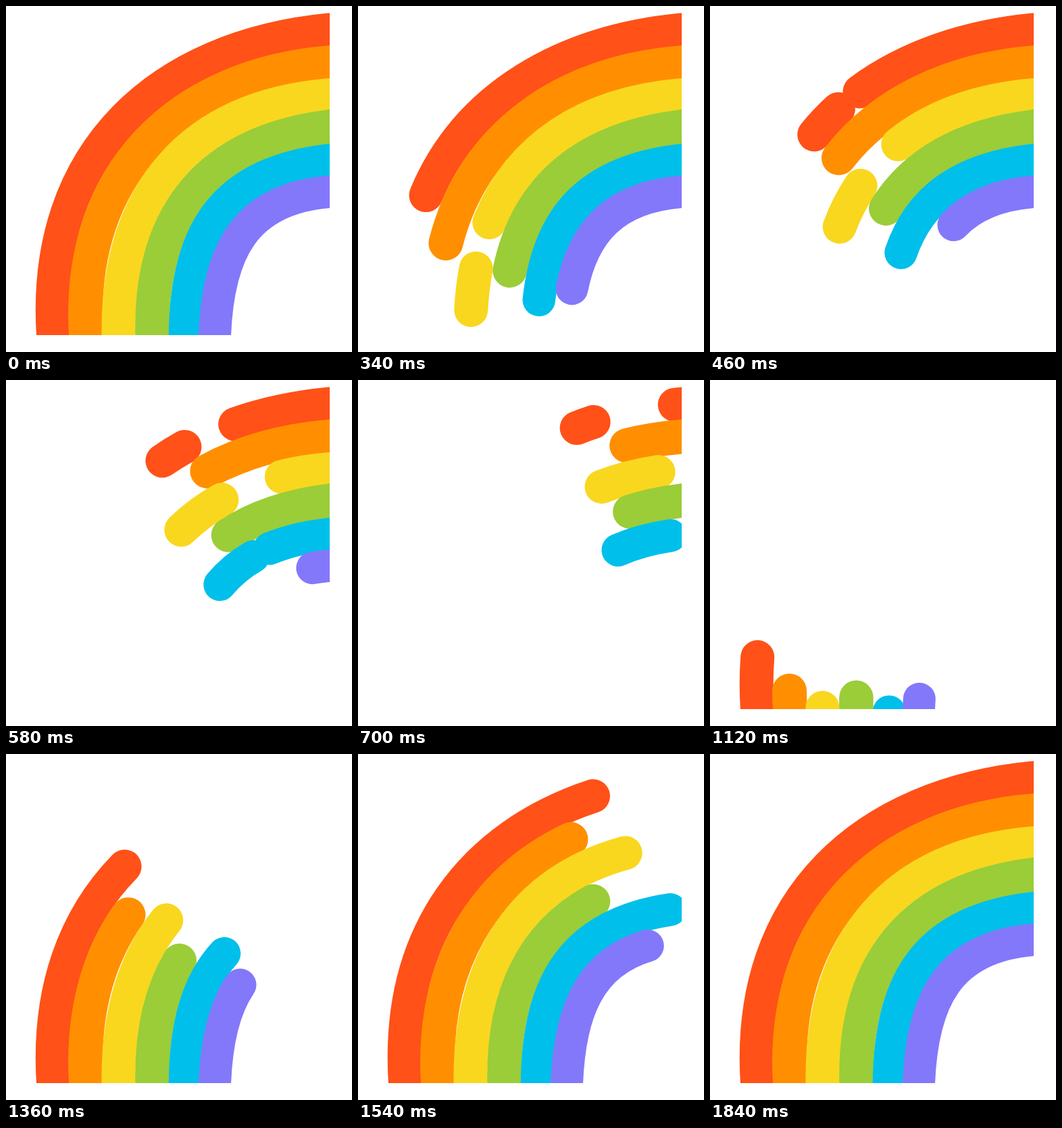
Write an HTML page with a canvas that moves like this. It is 512 px wide and 512 px high and loops after 1870 ms.

```html
<!DOCTYPE html>
<html>
<head>
<meta charset="utf-8">
<title>Rainbow</title>
<style>
  html, body { margin: 0; width: 100%; height: 100%; overflow: hidden; background: #fff; }
  canvas { display: block; width: 100vw; height: 100vh; }
</style>
</head>
<body>
<canvas id="stage" width="512" height="512"></canvas>
<script>
const ctx = document.getElementById('stage').getContext('2d');

const LOOP = 1870, HOLD = 100, STEP = 30;
const DRAW_FROM = 1000, DONE = 1840;
const LEAD = 60;   // hidden run-in and run-out beyond the clip box

// curve: cubic control points from the foot to the right edge.
// tail, front, main, head: [time, distance along the curve] keys.
// front and main bound the gap that opens behind the leading part.
const bands = [
  { color: '#ff5118', width: 50, curve: [70, 487, 52, 212, 232, 59, 479, 35.5],
    tail: [[100, 0], [340, 211], [580, 421], [820, 630]],
    front: [[340, 276], [820, 644]], main: [[340, 276], [580, 542]],
    head: [[1120, 77], [1360, 348]] },
  { color: '#ff8f00', width: 51, curve: [118.5, 487, 104, 245, 258, 102, 479, 84],
    tail: [[140, -25], [340, 137], [580, 419], [820, 633]],
    head: [[1120, 27], [1360, 262]] },
  { color: '#f9d71f', width: 50, curve: [166.5, 487, 164, 274, 276, 149, 479, 132],
    tail: [[340, 37], [580, 289], [820, 530]],
    front: [[340, 99], [580, 364]], main: [[340, 170], [580, 459]],
    head: [[1120, 2], [1360, 256]] },
  { color: '#9acd38', width: 50.5, curve: [216.5, 487, 213, 302, 305, 200, 479, 178.5],
    tail: [[340, 96], [580, 294], [820, 457]],
    head: [[1120, 17], [1360, 188]] },
  { color: '#00bfea', width: 48.5, curve: [265, 487, 266, 330, 325, 245, 479, 228],
    tail: [[340, 52], [580, 195], [820, 367]],
    front: [[500, 192], [820, 464]], main: [[500, 192], [820, 572]],
    head: [[1120, -4], [1360, 205]] },
  { color: '#8378fa', width: 48, curve: [309, 487, 314, 365, 352, 285, 479, 275],
    tail: [[340, 69], [580, 280]],
    head: [[1120, 15], [1360, 152]] }
];

function makePath([x0, y0, x1, y1, x2, y2, x3, y3]) {
  const path = new Path2D();
  const k = LEAD / Math.hypot(x3 - x2, y3 - y2);
  path.moveTo(x0, y0 + LEAD);
  path.lineTo(x0, y0);
  path.bezierCurveTo(x1, y1, x2, y2, x3, y3);
  path.lineTo(x3 + (x3 - x2) * k, y3 + (y3 - y2) * k);
  return path;
}
for (const band of bands) band.path = makePath(band.curve);

// Linear between keys, extended beyond both ends.
function at(keys, t) {
  let i = 0;
  while (i < keys.length - 2 && t > keys[i + 1][0]) i++;
  const [[ta, a], [tb, b]] = [keys[i], keys[i + 1]];
  return a + (b - a) * (t - ta) / (tb - ta);
}

function strokePart(band, from, to) {
  const a = Math.max(0, from + LEAD), b = to + LEAD;
  if (b <= a) return;
  ctx.setLineDash([b - a, 9999]);
  ctx.lineDashOffset = -a;
  ctx.stroke(band.path);
}

function drawBand(band, t) {
  ctx.strokeStyle = band.color;
  ctx.lineWidth = band.width;
  if (t < HOLD || t >= DONE) return strokePart(band, -LEAD, 2000);
  if (t >= DRAW_FROM) return strokePart(band, -LEAD, at(band.head, t));
  const tail = at(band.tail, t);
  if (!band.main) return strokePart(band, tail, 2000);
  const front = at(band.front, t), main = at(band.main, t);
  if (main <= front) return strokePart(band, tail, 2000);
  strokePart(band, tail, front);
  strokePart(band, Math.max(main, tail), 2000);
}

function render(t) {
  ctx.clearRect(0, 0, 512, 512);
  ctx.save();
  ctx.beginPath();
  ctx.rect(0, 0, 479, 487);
  ctx.clip();
  ctx.lineCap = 'round';
  for (const band of bands) drawBand(band, t);
  ctx.restore();
}

const start = performance.now();
function tick() {
  const t = (performance.now() - start) % LOOP;
  render(t < HOLD ? 0 : HOLD + Math.floor((t - HOLD) / STEP) * STEP);
  requestAnimationFrame(tick);
}
tick();
</script>
</body>
</html>
```
